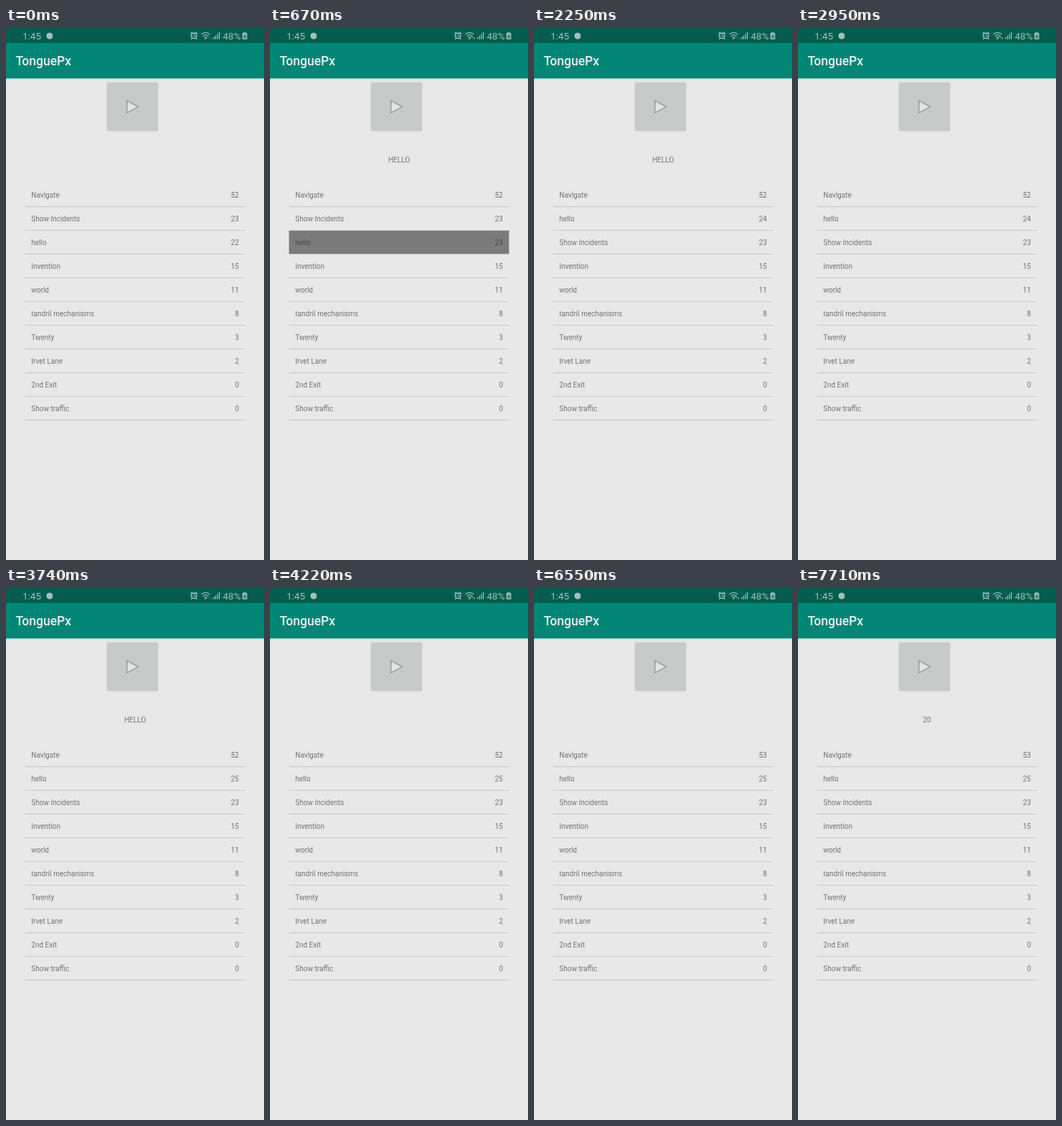
Write an HTML page that moves like this. It is 360x740 px and loops after 8 s.

```html
<!DOCTYPE html>
<html lang="en">
<head>
<meta charset="utf-8">
<title>Voice commands</title>
<style>
html, body { margin: 0; width: 100%; height: 100%; overflow: hidden; background: #e8e8e8; }
svg { display: block; width: 360px; height: 740px; font: 10px Roboto, sans-serif; }
.status { font-size: 13.5px; fill: #9fc1ba; }
.title { font-size: 17.5px; font-weight: 500; fill: #e3eeeb; }
.icon { fill: #9fc1ba; }
.outline { fill: none; stroke: #9fc1ba; }
.copy { fill: #747474; }
.end { text-anchor: end; }
.middle { text-anchor: middle; }
.picked .copy { fill: #464646; }
.picked .back { fill: #7b7b7b; }
</style>
</head>
<body>
<svg viewBox="0 0 360 740">
  <defs>
    <linearGradient id="shade" x2="0" y2="1">
      <stop stop-color="#c3cfcd"/><stop offset="1" stop-color="#e8e8e8"/>
    </linearGradient>
  </defs>
  <rect width="360" height="740" fill="#e8e8e8"/>
  <rect y="70" width="360" height="3" fill="url(#shade)"/>
  <rect y="21" width="360" height="49" fill="#048677"/>
  <rect width="360" height="21" fill="#045d4f"/>
  <text class="title" x="13.5" y="52">TonguePx</text>

  <text class="status" x="23" y="15.5">1:45</text>
  <circle class="icon" cx="60.8" cy="11" r="4.5"/>
  <g class="outline">
    <circle cx="262.3" cy="10.8" r="3.8" stroke-width="1.5"/>
    <path d="M262.3 8.5v2.6l1.8 1M257.6 8l2.4-2.2M267 8l-2.4-2.2M259.5 14.3l-1.3 1.5M265 14.3l1.3 1.5" stroke-width="1.2"/>
    <path d="M272.5 8.8q6-5 12 0M274.6 11.2q4-3.2 7.8 0M276.6 13.4q2-1.5 3.8 0" stroke-width="1.3"/>
    <path d="M289.8 12.8v2.7M292.4 10.8v4.7M295 8.5v7M297.6 6v9.5" stroke-width="1.3"/>
  </g>
  <circle class="icon" cx="278.5" cy="15" r="1"/>
  <path id="traffic" class="icon" d="M280.6 13.2l1.4-2 1.4 2zM283.4 13.6h2.8l-1.4 2.2z"/>
  <text class="status" x="302.5" y="15.5">48%</text>
  <path class="icon" d="M332 5.8h2.4v1h2v9h-6.6v-9H332z"/>
  <path d="M331.5 11h3.4v3h-3.4zM332 11V9.6h2.4V11" fill="#45867b" stroke="#45867b" stroke-width=".6"/>

  <rect id="button" x="140.5" y="75.5" width="72" height="68" rx="2"/>
  <path d="M168.8 101v17l15.6-8.5z" fill="#e3e4e3" stroke="#a0a3a2" stroke-width="1.8" stroke-linejoin="round"/>
  <text id="heard" class="copy middle" x="180" y="186.7"></text>
  <g id="list"></g>
</svg>
<script>
const LOOP = 8000;
const byId = id => document.getElementById(id);

// Each track holds [start time, value] pairs.
const heardTrack = [[0, ""], [670, "HELLO"], [1280, ""], [1860, "HELLO"], [2650, ""],
  [3370, "HELLO"], [4020, ""], [4650, "NAVIGATE"], [5440, ""], [7470, "20"]];
const pickedTrack = [[0, ""], [670, "hello"], [1040, ""], [1860, "hello"], [2250, ""],
  [3370, "hello"], [3740, ""], [4650, "Navigate"], [5220, ""]];
const idle = "#c8cac9", pressed = "#b0b2b1", fading = "#bcbebd";
const buttonTrack = [[0, idle], [1280, pressed], [1480, fading], [1540, idle],
  [2650, pressed], [2850, fading], [2950, idle], [4020, pressed], [4220, idle],
  [5440, pressed], [5640, idle]];
const trafficToggles = [50, 890, 1480, 2030, 2850, 3640, 4020, 4950, 5220, 5340, 6550, 7120, 7710];

const phrases = [["Navigate", 52, 4650], ["Show Incidents", 23], ["hello", 22, 670, 1860, 3370],
  ["Invention", 15], ["world", 11], ["tandril mechanisms", 8], ["Twenty", 3],
  ["Irvet Lane", 2], ["2nd Exit", 0], ["Show traffic", 0]];

const passed = (times, t) => times.filter(time => time <= t).length;
const valueAt = (track, t) => track[passed(track.map(([time]) => time), t) - 1][1];

byId("list").innerHTML = phrases.map((_, i) => `
  <g transform="translate(0 ${216 + 33 * i})">
    <rect class="back" x="26.5" width="307" height="32" fill="none"/>
    <rect x="26.5" y="32" width="307" height="1" fill="#c6c6c6"/>
    <text class="copy" x="35.3" y="20"></text>
    <text class="copy end" x="325" y="20"></text>
  </g>`).join("");
const rows = [...byId("list").children];

function draw(t) {
  const picked = valueAt(pickedTrack, t);
  const ranking = phrases
    .map(([name, count, ...hits]) => ({ name, count: count + passed(hits, t) }))
    .sort((a, b) => b.count - a.count);
  rows.forEach((row, i) => {
    const { name, count } = ranking[i];
    const [label, number] = row.querySelectorAll("text");
    label.textContent = name;
    number.textContent = count;
    row.classList.toggle("picked", name === picked);
  });
  byId("heard").textContent = valueAt(heardTrack, t);
  byId("button").setAttribute("fill", valueAt(buttonTrack, t));
  byId("traffic").setAttribute("opacity", passed(trafficToggles, t) % 2 ? 1 : 0.35);
}

const start = performance.now();
function tick() {
  draw((performance.now() - start) % LOOP);
  requestAnimationFrame(tick);
}
tick();
</script>
</body>
</html>
```
